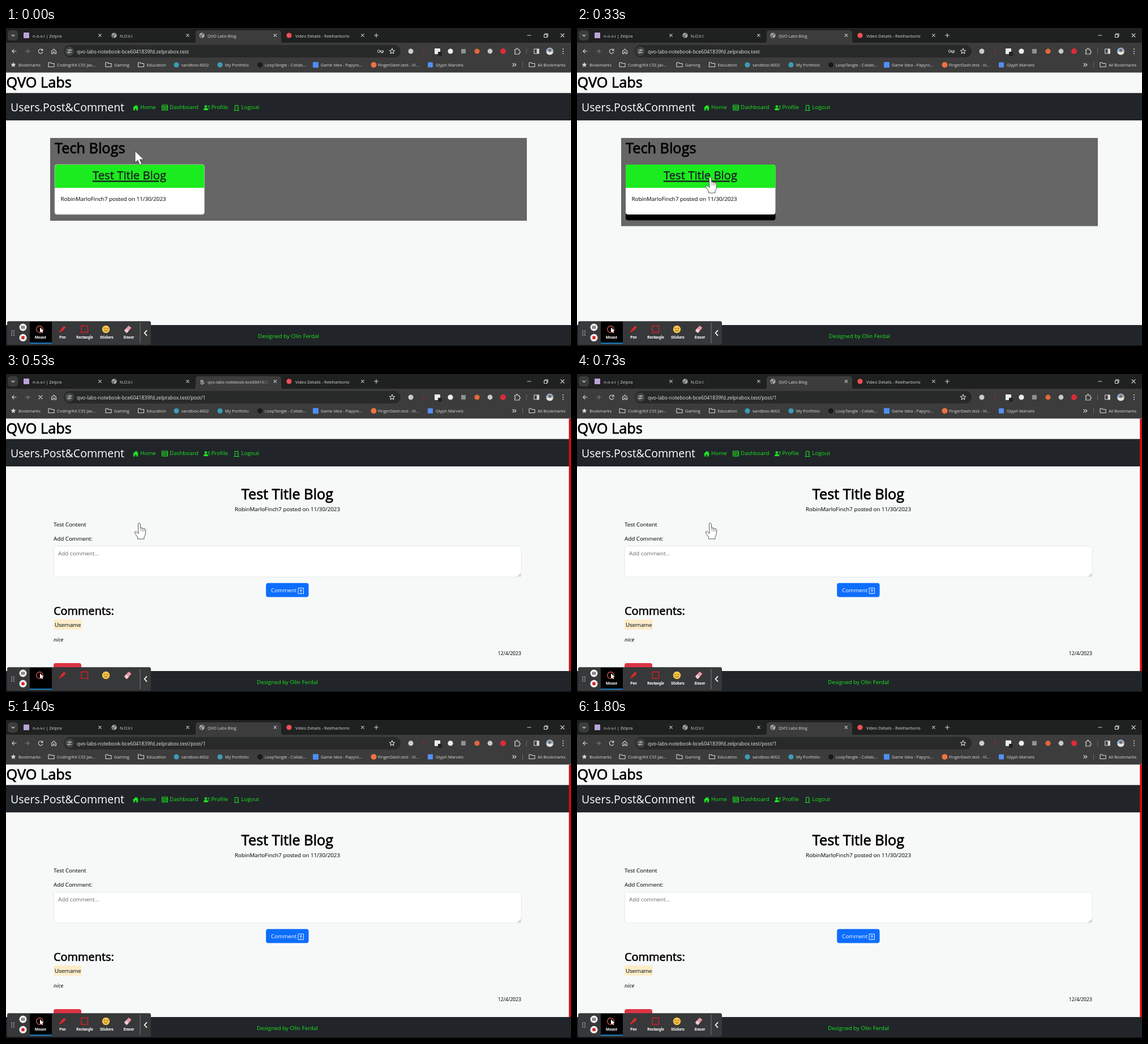
An HTML page for the animation above (1860 ms loop, 998 px wide and 561 px high).

```html
<!DOCTYPE html>
<html lang="en">
<head>
<meta charset="utf-8">
<title>Blog demo</title>
<style>
html, body { margin: 0; width: 100%; height: 100%; overflow: hidden; background: #f7f9f9; }
svg { display: block; width: 998px; height: 561px; }
text { font-family: "Open Sans", "Noto Sans", sans-serif; font-size: 9.8px; fill: #1b1f22; white-space: pre; }
.line { fill: none; stroke: #d6d7d8; stroke-width: 1.1; stroke-linecap: round; stroke-linejoin: round; }
.ui { font-size: 7.4px; fill: #d9dadc; }
.url { font-size: 8.8px; fill: #e6e7e8; }
.body { stroke: #1b1f22; stroke-width: .15px; }
.h1 { font-size: 25.3px; fill: #000; stroke: #000; stroke-width: .8px; }
.h2 { font-size: 19.9px; fill: #000; stroke: #000; stroke-width: .65px; }
.card { font-size: 20.3px; stroke: #1b1f22; stroke-width: .4px; text-decoration: underline; }
.brand { font-size: 19.5px; fill: #fff; }
.nav { fill: #1ce81f; }
.navline { stroke: #1ce81f; stroke-width: 1; }
.white { fill: #fff; }
.mid { text-anchor: middle; }
.tool { font: 700 6.5px Roboto, "Liberation Sans", sans-serif; fill: #fff; text-anchor: middle; }
</style>
</head>
<body>
<svg id="stage" viewBox="0 0 998 561" xmlns="http://www.w3.org/2000/svg"></svg>
<script>
const LOOP = 1860, TICK = 200 / 3;
const BRAND = "QVO Labs";
const HOST = "qvo-labs-notebook-bce6041839fd.zelprabox.test";
const BYLINE = "RobinMarloFinch7 posted on 11/30/2023";

const text = (x, y, s, cls = "body", extra = "") => `<text x="${x}" y="${y}" class="${cls}" ${extra}>${s.replace(/&/g, "&amp;")}</text>`;
const rect = (x, y, w, h, fill, r = 0, extra = "") => `<rect x="${x}" y="${y}" width="${w}" height="${h}" rx="${r}" fill="${fill}" ${extra}/>`;
const dot = (x, y, r, fill, extra = "") => `<circle cx="${x}" cy="${y}" r="${r}" fill="${fill}" ${extra}/>`;
const line = (d, style = "", cls = "") => `<path class="line ${cls}" d="${d}" style="${style}"/>`;
const shape = (d, fill, extra = "") => `<path d="${d}" fill="${fill}" ${extra}/>`;
const group = (id, body, extra = "") => `<g id="${id}" ${extra}>${body}</g>`;
const cross = (x, y, r) => line(`M${x - r} ${y - r}l${2 * r} ${2 * r}m0 ${-2 * r}l${-2 * r} ${2 * r}`);
const globe = (x, y) => dot(x, y, 4.6, "#a9abad") +
  shape(`M${x - 3.5} ${y - 1}l3 1 1 2-1 2-2-1zM${x} ${y - 3.5}l3 1-1 2-2-.5z`, "#55585b");
const folder = (x, y) => line(`M${x} ${y - 3}v7h10v-6h-5l-1.5-1.5H${x}z`);
const star = (x, y, r) => "M" + Array.from({ length: 10 }, (_, i) => {
  const a = i * Math.PI / 5, k = i % 2 ? r * .45 : r;
  return `${(x + k * Math.sin(a)).toFixed(2)} ${(y - k * Math.cos(a)).toFixed(2)}`;
}).join("L") + "Z";

function tabStrip() {
  return rect(0, 0, 998, 27, "#1f2020") + rect(3, 4, 18, 18, "#3a3b3b", 5) + line("M10 12l2.5 2.5L15 12") +
    shape("M330 27q5 0 5-5V9q0-5 5-5H481q5 0 5 5V22q0 5 5 5z", "#3c3c3c") +
    rect(31, 8, 10, 10, "#b9a3d8", 1) + text(47, 16.7, "n-o-v-i | Zelpra", "ui") +
    globe(191, 13) + text(201, 16.7, "N.O.V.I", "ui") +
    group("favicon", globe(346, 13)) +
    group("spinner", dot(346, 13, 3, "#8c8f92") + group("arc", line("M346 8.4a4.6 4.6 0 0 1 4.6 4.6"))) +
    text(356, 16.7, BRAND + " Blog", "ui", 'id="tabName"') +
    group("tabHost", text(356, 16.7, HOST, "ui"), 'clip-path="url(#tabClip)"') +
    rect(450, 6, 16, 16, "url(#tabFade)", 0, 'id="fade"') +
    dot(500, 13, 4.6, "#ef4f55") + text(511, 16.7, "Video Details - Reelharborio", "ui") +
    [166, 321, 475.5, 630].map(x => cross(x, 13, 2.2)).join("") +
    line("M650.5 13h7M654 9.5v7M921 13h6M980 10l6 6m0-6l-6 6") +
    line("M950.5 11.5h5v5h-5zM952 11.5v-1.5h5v5h-1.5");
}

function addressBar() {
  return rect(0, 26, 998, 52.6, "#3c3c3c") + rect(102, 30, 595, 22, "#282929", 11) +
    line("M18 41h-7m3-3.2L10.8 41l3.2 3.2") +
    line("M34 41h7m-3-3.2L41.2 41 38 44.2", "stroke:#7b7c7d") +
    group("reload", line("M64.3 39a3.8 3.8 0 1 0 .4 3.4M64.8 37v2.6h-2.6")) +
    group("stop", cross(61, 41, 3)) +
    line("M80.5 41l4-3.8 4 3.8v4.2h-2.7v-3h-2.6v3h-2.7z") +
    dot(112, 41, 8, "#414343") + line("M108.5 39h3m3.4 0h.8M108.5 43h.6m3.5 0h3") +
    dot(113.2, 39, 1.3, "none", 'stroke="#d6d7d8"') + dot(110.8, 43, 1.3, "none", 'stroke="#d6d7d8"') +
    text(125, 44.5, HOST, "url", 'id="url"') +
    group("key", dot(658.5, 41, 2.2, "none", 'stroke="#d6d7d8"') + line("M661 40.2h5.5v2h-1.3v1.5h-2v-1.5h-2")) +
    line(star(682, 41, 5)) +
    dot(715, 41, 4.5, "#c9cdd3") + rect(737.5, 37, 1.2, 8, "#a5252b") +
    rect(757, 36, 10, 10, "#e9ecee", 1) + rect(763, 42, 7, 7, "#202224", 1) +
    dot(785, 41, 4.6, "#eeeeee") + rect(804, 37, 8, 8, "#8f9193", 1) + dot(832, 41, 4.6, "#e4673c") +
    dot(855, 41, 4.4, "#c7c9ca") + dot(878, 41, 5, "#dc2c38") +
    line("M898.5 38h2.7v-1a1.4 1.4 0 0 1 2.8 0v1h2.7v2.7h.4a1.4 1.4 0 0 1 0 2.8h-.4V46h-8.2v-2.5a1.4 1.4 0 0 0 0-2.8z") +
    rect(919, 36, 1, 10, "#65686a") + line("M932.8 37h8.4v8h-8.4z") + rect(937.5, 37, 4, 8, "#d6d7d8") +
    dot(960.5, 41, 6.5, "#8fb6d9") + shape("M954.4 43q6-5 12.2 0a6.5 6.5 0 0 1-12.2 0z", "#e6e2dc") + dot(960.5, 39.5, 2.8, "#8b6a55") +
    [37, 41, 45].map(y => dot(984, y, 1, "#d6d7d8")).join("");
}

function bookmarks() {
  const label = (x, s) => text(x, 67.6, s, "ui");
  const folders = [[75, "Coding/Kit CSS Jav..."], [176, "Gaming"], [233.5, "Education"], [924, "All Bookmarks"]];
  return shape(star(13, 65, 4.8), "#d6d7d8") + label(22, "Bookmarks") +
    folders.map(([x, s]) => folder(x, 64.5) + label(x + 15, s)).join("") +
    dot(301, 65, 4.6, "#3c9cb8") + label(310, "sandbox:4002") +
    dot(378, 65, 4.6, "#3c9cb8") + label(387, "My Portfolio") +
    dot(448.5, 65, 4.5, "#17191a") + label(457, "LoopTangle - Collab...") +
    rect(542, 60, 10, 10, "#4d8df6", 1) + label(556, "Game Idea - Papyro...") +
    dot(649.5, 65, 5, "#ee7241") + label(657, "FingerDash.test - Vi...") +
    rect(745, 60.5, 9, 9, "#5590ef", 1) + label(759, "Glyph Marvels") +
    line("M895 62.5l2.5 2.5-2.5 2.5m3.5-5l2.5 2.5-2.5 2.5") + rect(912, 60, 1, 10, "#65686a");
}

function header() {
  const icon = d => line(d, "", "navline");
  return text(.5, 105, BRAND, "h1") + rect(0, 114.7, 998, 48.3, "#212529") +
    text(8, 147.4, "Users.Post&Comment", "brand") +
    shape("M224 141l5-5 1.8 1.8V136.3h1.5v2.9l1.9 1.8-.8.8-.5-.4v4.1h-2.7V142h-2.4v3.5h-2.7v-4.1l-.5.4z", "#1ce81f") +
    text(237, 143.4, "Home", "nav") +
    icon("M276 136h9.5v9H276zM276 138.5h9.5M278 140.5h2.5v2.5H278zM282 140.5h2.5M282 143h2.5") +
    text(289, 143.4, "Dashboard", "nav") +
    dot(352.8, 138.4, 2.2, "#1ce81f") + shape("M349 145q0-4 4-4t4 4z", "#1ce81f") +
    icon("M356.5 137.5h3M357 140h2.5M358 142.5h1.5") + text(362.5, 143.4, "Profile", "nav") +
    icon("M404.5 145.5v-9h5.5v9M403 145.5h8.5") + dot(408.5, 141, .7, "#1ce81f") + text(415.5, 143.4, "Logout", "nav");
}

function listPage() {
  return rect(78, 194, 842, 146, "#666", 0, 'id="panel"') + text(86, 220.5, "Tech Blogs", "h1") +
    rect(86, 320, 264.5, 19.2, "#000", 4, 'id="cardEdge"') +
    rect(86, 241, 264.5, 88, "#fff", 4) +
    shape("M86 282V245q0-4 4-4H346.5q4 0 4 4V282z", "#1bec1f") +
    rect(86, 240.7, 264.5, 88.3, "none", 4, 'id="outline" stroke="#b5bcb5" stroke-width=".8"') +
    text(218, 267.3, "Test Title Blog", "card mid") + text(96.5, 304.5, BYLINE);
}

function postPage() {
  return text(497, 220.5, "Test Title Blog", "h1 mid") + text(497, 242.3, BYLINE, "body mid") +
    text(84, 268.5, "Test Content") + text(84, 294.3, "Add Comment:") +
    rect(84.3, 303.5, 826, 54.5, "#fff", 4, 'stroke="#dee2e6" stroke-width=".8"') +
    text(92, 319.5, "Add comment...", "", 'style="fill:#62686e"') +
    line("M904.5 357l4.5-4.5M907.5 357l1.5-1.5", "stroke:#666;stroke-width:.8") +
    rect(459.2, 368.8, 75.4, 24.8, "#0d6efd", 4) + text(468, 385.2, "Comment", "white") +
    line("M516.5 377.5h9v10h-9zM521 385.5v-5.5m-2 2l2-2 2 2", "stroke:#fff;stroke-width:.9") +
    text(84, 424.8, "Comments:", "h2") +
    rect(84, 433, 50, 18, "#fdedca") + text(86, 446, "Username", "body", 'style="font-size:9.6px"') +
    text(84, 471.5, "nice", "body", 'font-style="italic"') +
    text(910, 495.8, "12/4/2023", "body", 'text-anchor="end" style="font-size:8.7px"') +
    rect(84, 510, 49, 25, "#dc3545", 4) + text(90, 523.5, "Delete") +
    rect(994.3, 79, 3.7, 445, "#d90b0b");
}

function recorder() {
  const names = [[61, "Mouse"], [100, "Pen"], [139, "Rectangle"], [178, "Stickers"], [217, "Eraser"]];
  const grip = [0, 1, 2, 3, 4, 5].map(i => dot(10.3 + i % 2 * 3.6, 534.5 + (i >> 1) * 3.6, .9, "#d0d0d0")).join("");
  return rect(2, 517.3, 254, 41.4, "#37383a", 3) + rect(42, 518, 39, 38, "#000") + rect(42, 555, 39, 1.8, "#1683cf") +
    rect(236.5, 520, 1, 36, "#77797b") + grip +
    dot(30, 528, 6.5, "#f2f2f2") + rect(27.6, 525.3, 1.6, 5.4, "#222") + rect(30.8, 525.3, 1.6, 5.4, "#222") +
    dot(30, 546.3, 6.5, "#f2f2f2") + rect(27.3, 543.6, 5.4, 5.4, "#d92424", 1) +
    dot(59.5, 531.5, 5.8, "none", 'stroke="#e8604c" stroke-width="1.3"') + shape("M60 528v9l2.2-1.8 1.4 3 1.5-.7-1.4-2.9h2.8z", "#fff") +
    shape("M94 537l1.5-4 7-7.5 3 2.8-7.2 7.4z", "#e52b2b") + line("M96.5 533l2.7 2.7", "stroke:#8d1818") +
    rect(133, 525.5, 11.5, 11.5, "none", 0, 'stroke="#d31f26" stroke-width="1.5"') +
    dot(176.5, 531.5, 6.7, "#f8c64b") +
    line("M172.8 530.3q1.3-1.8 2.6 0m2.4 0q1.3-1.8 2.6 0M173.5 533.2q3 3.5 6 0", "stroke:#704514;stroke-width:1") +
    shape("M209 533.5l7.5-8.5 5 3.8-7.3 8.7h-2z", "#e79aa5") + shape("M209 533.5l2.8-3.2 5 3.8-2.6 3.4h-2z", "#f6cdd2") +
    line("M248.5 533.8l-4 4.2 4 4.2", "stroke:#fff;stroke-width:1.8") +
    group("labels", names.map(([x, s]) => text(x, 548.3, s, "tool")).join(""));
}

function cursors() {
  const pen = 'stroke="#2b2b2b" stroke-width=".8" stroke-linejoin="round"';
  const palm = "M-1.7 1.8Q-1.3-.2 .3 0T2.2 2L3 9Q4.5 7.3 5.8 9L6 10Q7.5 8 9 10.4 11.5 9.5 11.7 13L11.2 20Q10.5 22.5 9 24.5V28H-2.5V25Q-6 20.5-7.5 17-8 14.5-6 14.8-4 15.2-1 18.5Z";
  return group("arrow", shape("M0 0V20.5L4.7 16.3 8.3 24.5 11.8 23 8.3 15H15.5Z", "#fff", pen)) +
    group("hand", shape(palm, "#fff", pen) + line("M3 9l.6 5M6 10l.4 4.5M9 10.4v4.5", "stroke:#444;stroke-width:.6"));
}

const stage = document.getElementById("stage");
stage.innerHTML = `<defs>
  <clipPath id="tabClip"><rect x="356" y="4" width="109" height="22"/></clipPath>
  <linearGradient id="tabFade"><stop stop-color="#3c3c3c" stop-opacity="0"/><stop offset="1" stop-color="#3c3c3c"/></linearGradient>
  </defs>` + rect(0, 0, 998, 561, "#f7f9f9") + tabStrip() + addressBar() + bookmarks() + header() +
  group("list", listPage()) + group("post", postPage()) + rect(0, 524, 998, 36, "#212529") +
  text(499, 546.5, "Designed by Olin Ferdal", "nav mid", 'id="credit"') + rect(0, 560, 998, 1, "#0c0d0e") + recorder() + cursors();

const el = id => document.getElementById(id);
const show = (id, on) => el(id).setAttribute("display", on ? "inline" : "none");

// Pointer stops: time, x, y.
const path = [[0, 228, 217], [60, 231, 235], [130, 233.5, 253], [270, 235, 263], [860, 235, 263], [1060, 263, 266], [1200, 288, 269]];
function pointer(t) {
  const next = path.findIndex(p => p[0] > t);
  if (next < 0) return path[path.length - 1].slice(1);
  const [t0, x0, y0] = path[next - 1], [t1, x1, y1] = path[next];
  const k = (t - t0) / (t1 - t0);
  return [x0 + (x1 - x0) * k, y0 + (y1 - y0) * k];
}

function draw(ms) {
  const tick = Math.floor((ms % LOOP + 7) / TICK);
  const t = Math.floor(tick * TICK / 10) * 10;
  const hover = t >= 130, clicked = t >= 400, opened = t >= 530, loading = clicked && t < 730;
  const hand = hover && t < 930;

  show("list", !opened);
  show("post", opened);
  show("cardEdge", hover);
  show("outline", !hover);
  el("panel").setAttribute("height", hover ? 155.5 : 146);
  el("credit").setAttribute("x", opened ? 497 : 499);

  el("url").textContent = HOST + (clicked ? "/post/1" : "");
  show("key", !clicked);
  for (const id of ["reload", "tabName", "favicon"]) show(id, !loading);
  for (const id of ["stop", "tabHost", "fade", "spinner"]) show(id, loading);
  el("arc").setAttribute("transform", `rotate(${t * .9} 346 13)`);
  show("labels", t < 530 || t >= 600);

  const [x, y] = pointer(t);
  for (const id of ["arrow", "hand"]) el(id).setAttribute("transform", `translate(${x} ${y})`);
  show("hand", hand);
  show("arrow", !hand && t < 1260);
}

const start = performance.now();
function frame() {
  draw(performance.now() - start);
  requestAnimationFrame(frame);
}
draw(0);
requestAnimationFrame(frame);
</script>
</body>
</html>
```
